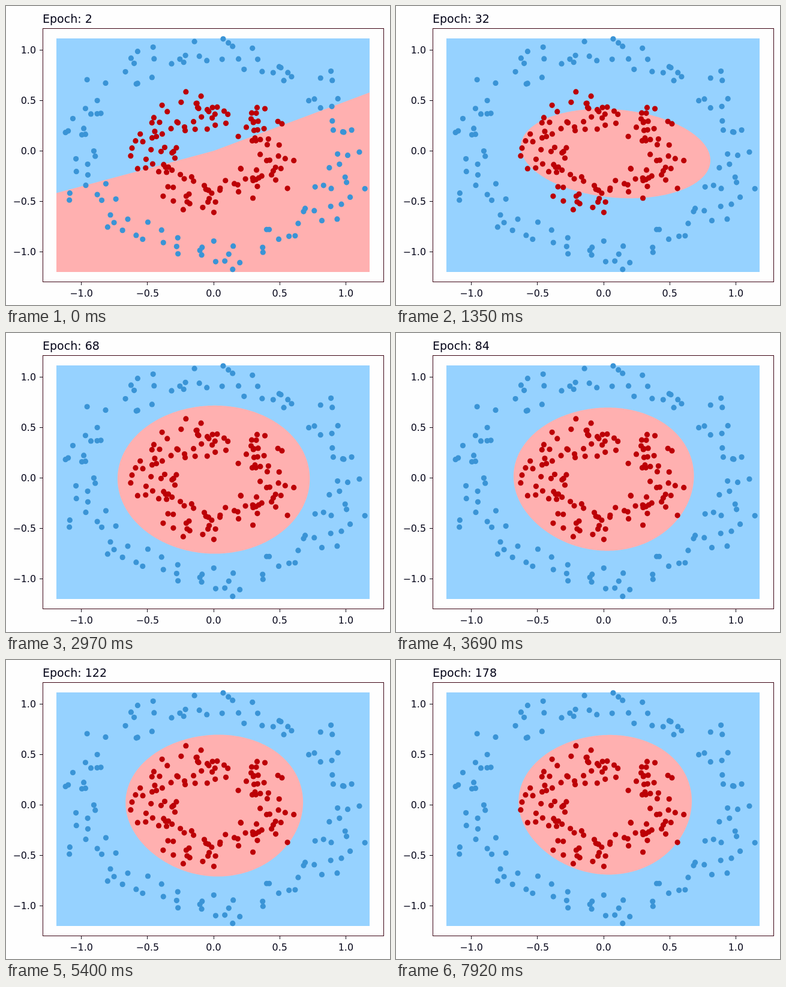
Write an HTML page that moves like this. It is 640 px wide and 498 px high and loops after 8 s.

```html
<!DOCTYPE html>
<html lang="en">
<head>
<meta charset="utf-8">
<title>Decision boundary</title>
<style>
  html, body { margin: 0; width: 100%; height: 100%; overflow: hidden; background: #fefefe; }
  svg { display: block; width: 640px; height: 498px; }
  text { font-family: "DejaVu Sans", sans-serif; font-size: 15.9px; fill: #06061a; }
  #title { font-size: 19.05px; }
  #axes { fill: none; stroke: #3d0414; shape-rendering: crispEdges; }
  #ticks { stroke: #15101c; shape-rendering: crispEdges; }
</style>
</head>
<body>
<svg viewBox="0 0 640 498">
  <clipPath id="area"><rect x="84" y="54" width="522" height="389"/></clipPath>
  <rect x="84" y="54" width="522" height="389" fill="#96d2ff"/>
  <path id="region" clip-path="url(#area)" fill="#ffb0b0"/>
  <g id="outer" fill="#3a94d6"></g>
  <g id="inner" fill="#bc0006"></g>
  <rect id="axes" x="61.5" y="37.5" width="568" height="422"/>
  <g id="ticks"></g>
  <g id="labels"></g>
  <text id="title" x="61" y="27.5"></text>
</svg>
<script>
const ORIGIN_X = 346, ORIGIN_Y = 241.3;
const UNIT_X = 220.4, UNIT_Y = 168;
const STEP = 90, LOOP = 8000;
const $ = id => document.getElementById(id);
const toX = u => ORIGIN_X + u * UNIT_X;
const toY = v => ORIGIN_Y - v * UNIT_Y;
const clamp = (value, low, high) => Math.min(high, Math.max(low, value));
const mix = (a, b, t) => a + (b - a) * t;

function add(parent, tag, attrs, text = '') {
  const node = document.createElementNS('http://www.w3.org/2000/svg', tag);
  for (const key in attrs) node.setAttribute(key, attrs[key]);
  node.textContent = text;
  $(parent).append(node);
}

// Axis ticks
for (let value = -1; value <= 1; value += 0.5) {
  const x = toX(value), y = toY(value);
  const label = value.toFixed(1).replace('-', '\u2212');
  add('ticks', 'line', { x1: x, x2: x, y1: 460, y2: 465 });
  add('ticks', 'line', { x1: 56, x2: 61, y1: y, y2: y });
  add('labels', 'text', { x, y: 484, 'text-anchor': 'middle' }, label);
  add('labels', 'text', { x: 50, y: y + 5.8, 'text-anchor': 'end' }, label);
}

// Two rings of evenly spaced samples with bell-shaped noise
let seed = 42;
function random() {
  seed = (seed * 16807) % 2147483647;
  return seed / 2147483647;
}
const noise = () => (random() + random() + random() - 1.5) * 0.2;

function scatter(id, total, radius) {
  for (let i = 0; i < total; i++) {
    const angle = i / total * 2 * Math.PI;
    const u = clamp(radius * Math.cos(angle) + noise(), -1.17, 1.16);
    const v = clamp(radius * Math.sin(angle) + noise(), -1.18, 1.11);
    add(id, 'circle', { cx: toX(u), cy: toY(v), r: 4.6 });
  }
}
scatter('outer', 120, 1);
scatter('inner', 130, 0.45);

// Inner class region: an ellipse that can lean and swell towards the upper right
const keys = [
  { at: 8, cx: 359, cy: 251, rx: 59, ry: 38, lean: 0.12, swell: 0 },
  { at: 14, cx: 368, cy: 246, rx: 160, ry: 72, lean: 0.15, swell: 0 },
  { at: 23, cx: 350, cy: 244, rx: 142, ry: 94, lean: 0.17, swell: 0 },
  { at: 30, cx: 346, cy: 244.5, rx: 164, ry: 125, lean: 0, swell: 0 },
  { at: 41, cx: 343, cy: 246, rx: 150, ry: 119, lean: 0, swell: 0.06 },
  { at: 88, cx: 345, cy: 244, rx: 144, ry: 116, lean: 0, swell: 0.07 }
];

function blobAt(step) {
  const next = Math.max(1, keys.findIndex(key => key.at >= step));
  const from = keys[next - 1], to = keys[next];
  const t = clamp((step - from.at) / (to.at - from.at), 0, 1);
  const blob = {};
  for (const name in from) blob[name] = mix(from[name], to[name], t);
  return blob;
}

function outline(step) {
  const { cx, cy, rx, ry, lean, swell } = blobAt(step);
  const closed = 1 - clamp(1 - step / keys[0].at, 0, 1) ** 3;
  const points = [];
  for (let degrees = -180; degrees < 180; degrees += 0.5) {
    const a = degrees * Math.PI / 180;
    const size = 1 + swell * Math.cos(a + Math.PI / 4) ** 3;
    const reach = degrees >= -20.5 && degrees <= 165 ? 700 : 0;
    const x = mix(ORIGIN_X + reach * Math.cos(a), cx + size * rx * Math.cos(a), closed);
    const y = mix(ORIGIN_Y + reach * Math.sin(a), cy + size * ry * Math.sin(a + lean), closed);
    points.push(x.toFixed(1) + ' ' + y.toFixed(1));
  }
  return 'M' + points.join('L') + 'Z';
}

let shown = -1;
function draw() {
  const step = Math.floor(performance.now() % LOOP / STEP);
  if (step !== shown) {
    shown = step;
    $('title').textContent = 'Epoch: ' + (2 + 2 * step);
    $('region').setAttribute('d', outline(step));
  }
  requestAnimationFrame(draw);
}
draw();
</script>
</body>
</html>
```
